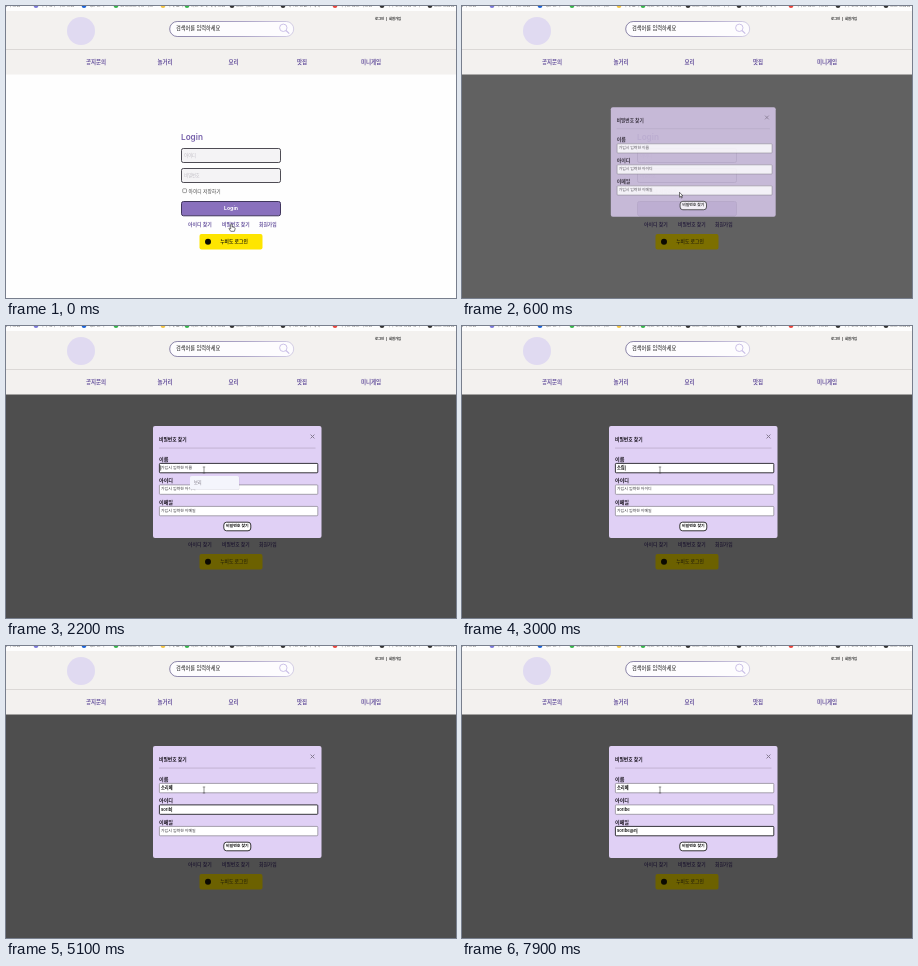
These frames come from a looping animation (450x292 px, 8000 ms). An HTML page with a canvas:

```html
<!DOCTYPE html>
<html>
<head>
<meta charset="utf-8">
<style>
html, body { margin: 0; width: 100%; height: 100%; overflow: hidden; background: #fff; }
canvas { display: block; width: 450px; height: 292px; }
</style>
</head>
<body>
<canvas id="stage"></canvas>
<script>
const W = 450, H = 292, LOOP = 8000, STEP = 100;
const canvas = document.getElementById('stage');
const ctx = canvas.getContext('2d');
const dpr = window.devicePixelRatio || 1;
canvas.width = W * dpr;
canvas.height = H * dpr;

const FONT = 'Inter, "Noto Sans CJK KR", "Noto Sans CJK", sans-serif';
const PURPLE = '#69559f';
const NAME = ['ㅅ', '소', '솔', '소리', '소립', '소리베'];
const MAIL = 'soribe@n';

const fields = [
  { label: '이름', y: 137, focus: 1200, keys: [2400, 2500, 2700, 2800, 2900, 3100], value: n => NAME[n - 1] },
  { label: '아이디', y: 158.5, focus: 3500, keys: [4300, 4500, 4700, 4800, 5100, 5300], value: n => MAIL.slice(0, n) },
  { label: '이메일', y: 180, focus: 5600, keys: [6200, 6300, 6500, 6700, 6900, 7000, 7600, 7900], value: n => MAIL.slice(0, n) }
];

// time, x, y of the pointer
const path = [[0, 225.5, 218.5], [500, 225.5, 218.5], [700, 209.5, 154], [1200, 198, 144]];

const clamp = v => Math.max(0, Math.min(1, v));
const mix = (a, b, p) => a + (b - a) * p;
const easeInOut = p => p < 0.5 ? 4 * p ** 3 : 1 - (2 - 2 * p) ** 3 / 2;

function text(str, x, y, size, color, weight = 700, align = 'left') {
  ctx.font = `${weight} ${size}px ${FONT}`;
  ctx.textAlign = align;
  ctx.textBaseline = 'middle';
  ctx.fillStyle = color;
  ctx.fillText(str, x, y);
}

function rect(x, y, w, h, color) {
  ctx.fillStyle = color;
  ctx.fillRect(x, y, w, h);
}

function box(x, y, w, h, r, fill, stroke, line = 1) {
  ctx.beginPath();
  ctx.roundRect(x, y, w, h, r);
  if (fill) {
    ctx.fillStyle = fill;
    ctx.fill();
  }
  if (stroke) {
    ctx.strokeStyle = stroke;
    ctx.lineWidth = line;
    ctx.stroke();
  }
}

function dot(x, y, r, color) {
  ctx.beginPath();
  ctx.arc(x, y, r, 0, Math.PI * 2);
  ctx.fillStyle = color;
  ctx.fill();
}

function lines(points, color, width) {
  ctx.beginPath();
  for (const [x1, y1, x2, y2] of points) {
    ctx.moveTo(x1, y1);
    ctx.lineTo(x2, y2);
  }
  ctx.strokeStyle = color;
  ctx.lineWidth = width;
  ctx.stroke();
}

function drawBookmarks() {
  rect(0, 0, W, 5, '#fdfdfd');
  const marks = [
    [-14, '#777', '즐겨찾기 모음'], [30, '#7a78d8', '자바 공부 자료 모음'], [78, '#1a62d6', '개발 문서'],
    [110, '#35b44a', '웹 프로그래밍 기초'], [157, '#f2c342', '과제 폴더'], [181, '#35b44a', '화면 설계 예제 모음'],
    [226, '#333', '프로젝트 저장소 목록'], [277, '#333', '게시판 만들기 예제'], [329, '#e8443c', '디자인 참고 자료집'],
    [376, '#333', '서버 설정 방법 정리'], [424, '#333', '코드 모음집']
  ];
  for (const [x, color, label] of marks) {
    dot(x, -0.4, 2.4, color);
    text(label, x + 4, -0.9, 4.2, '#666', 400);
  }
}

function drawHeader() {
  rect(0, 5, W, 63.5, '#f3f1ef');
  rect(0, 43, W, 1, '#dbd8d6');
  drawBookmarks();
  dot(75, 25, 14, '#e0daf1');

  const edge = ctx.createLinearGradient(163, 15, 288, 31);
  edge.addColorStop(0, '#6d6592');
  edge.addColorStop(0.6, '#9a91bb');
  edge.addColorStop(1, '#cbc4e2');
  box(163.7, 15.5, 124, 15, 7.5, '#fdfcfe', edge, 0.8);
  text('검색어를 입력하세요', 170, 22.8, 5.2, '#151515', 500);
  ctx.beginPath();
  ctx.arc(277.3, 21.8, 3.7, 0, Math.PI * 2);
  ctx.strokeStyle = '#c8bde6';
  ctx.lineWidth = 0.9;
  ctx.stroke();
  lines([[280, 24.5, 283.3, 27.6]], '#c8bde6', 1.2);

  text('로그인', 369, 12.9, 3.3, '#222');
  text('|', 380.6, 12.9, 3.3, '#222', 700, 'center');
  text('회원가입', 383, 12.9, 3.3, '#222');

  const nav = [['공지문의', 90], ['놀거리', 159], ['요리', 227.5], ['맛집', 296], ['미니게임', 365]];
  for (const [label, x] of nav) text(label, x, 55.9, 5.5, PURPLE, 700, 'center');
}

function drawLogin(t) {
  text('Login', 175, 131.3, 8.2, '#7660aa', 600);
  [['아이디', 142.5], ['비밀번호', 162.5]].forEach(([hint, y]) => {
    box(175.5, y, 99, 14, 1.8, '#f4f3f5', '#3c3942', 0.9);
    text(hint, 178.3, y + 7, 4.2, '#bcb9c0', 400);
  });
  box(176.7, 182.8, 3.8, 3.8, 0.7, '#fff', '#777', 0.7);
  text('아이디 저장하기', 182.5, 185.2, 4.8, '#444', 500);
  box(175.5, 195.5, 99, 14.3, 2, '#8970bd', '#40365d', 1);
  text('Login', 225, 202.5, 5.2, '#fff', 700, 'center');

  const hover = t >= 100 && t < 600;
  text('아이디 찾기', 182, 218.2, 4.9, PURPLE);
  text('비밀번호 찾기', 216, 218.2, 4.8, hover ? '#b9afd0' : PURPLE);
  text('회원가입', 253, 218.2, 4.8, PURPLE);
}

function drawSocial(p) {
  const fill = `rgb(${mix(254, 108, p)}, ${mix(229, 97, p)}, 0)`;
  box(193.5, 228, 63, 15.5, 2, fill);
  dot(202, 235.8, 3, '#0b0a02');
  text('누비도 로그인', 228, 235.9, 4.8, '#332d06', 700, 'center');
}

function drawField(f, t, active) {
  const count = f.keys.filter(k => k <= t).length;
  const mid = f.y + 4.8;
  text(f.label, 153, f.y - 3.6, 5.1, '#151019');
  box(153.4, f.y + 0.4, 158.4, 9.4, 0.8, '#fff', active ? '#222226' : '#86818c', active ? 0.9 : 0.7);

  if (count) text(f.value(count), 155, mid, 4.2, '#111', 600);
  else text(`가입시 입력한 ${f.label}`, 155, mid, 3.95, '#333037', 500);

  const last = count ? f.keys[count - 1] : f.focus;
  if (active && Math.floor((t - last) / 500) % 2 === 0) {
    const x = count ? 155.2 + ctx.measureText(f.value(count)).width : 154.5;
    rect(x, mid - 2.4, 0.6, 5.2, '#111');
  }
}

function drawModal(t, p) {
  if (p <= 0) return;
  const scale = mix(0.8, 1, p);
  ctx.save();
  ctx.globalAlpha = p * p;
  ctx.translate(231.5, 156);
  ctx.scale(scale, scale);
  ctx.translate(-231.5, -156);

  box(147, 100, 168.5, 112, 2, '#e0d0f5');
  text('비밀번호 찾기', 153, 113.6, 4.8, '#151019');
  lines([[304.6, 108.6, 308.4, 112.4], [308.4, 108.6, 304.6, 112.4]], '#857a91', 1);
  rect(153, 121.7, 156.5, 0.7, '#b3a6c3');

  const active = fields.filter(f => f.focus <= t).pop();
  for (const f of fields) drawField(f, t, f === active);

  box(217.8, 196.2, 27, 8.6, 2.8, '#fff', '#222', 0.9);
  text('비밀번호 찾기', 231.3, 200.3, 3.95, '#111', 700, 'center');

  if (t >= 1200 && t < 2400) {
    box(184, 150.5, 49.3, 13.6, 1.5, 'rgba(60,50,80,.15)');
    box(184, 150, 49, 13.5, 1.5, '#f4f5fc');
    text('보리', 188, 156.3, 4.2, '#77717e', 500);
  }
  ctx.restore();
}

function pointerAt(t) {
  const i = path.findIndex(k => k[0] > t);
  if (i < 0) return path[path.length - 1].slice(1);
  const a = path[i - 1], b = path[i];
  const p = (t - a[0]) / (b[0] - a[0]);
  return [mix(a[1], b[1], p), mix(a[2], b[2], p)];
}

function drawPointer(t) {
  const [x, y] = pointerAt(t);
  ctx.save();
  ctx.translate(x, y);
  if (t >= 1200) {
    lines([[0, -2.8, 0, 2.8], [-1.2, -3, 1.2, -3], [-1.2, 3, 1.2, 3]], '#444', 0.6);
  } else {
    const shape = t < 600
      ? 'M-.8 0Q0-.8.7 0V2.4L3 2.9Q3.8 3.2 3.6 4.4L2.9 6.8H-.8L-2.5 4.3Q-2.5 3.3-1.6 3.8L-.8 4.4Z'
      : 'M0 0V5L1.1 4L1.9 5.8L2.7 5.5L1.9 3.7H3.4Z';
    const p = new Path2D(shape);
    ctx.fillStyle = '#fff';
    ctx.fill(p);
    ctx.strokeStyle = '#222';
    ctx.lineWidth = 0.6;
    ctx.stroke(p);
  }
  ctx.restore();
}

function draw(t) {
  const p = easeInOut(clamp((t - 390) / 300));
  ctx.setTransform(dpr, 0, 0, dpr, 0, 0);
  rect(0, 0, W, H, '#fefefe');
  drawLogin(t);
  rect(0, 68, W, H - 68, `rgba(0,0,0,${0.69 * p})`);
  drawSocial(p);
  drawHeader();
  drawModal(t, p);
  drawPointer(t);
}

const start = performance.now();
function tick() {
  const t = (performance.now() - start) % LOOP;
  draw(Math.floor(t / STEP) * STEP);
  requestAnimationFrame(tick);
}
tick();
</script>
</body>
</html>
```
